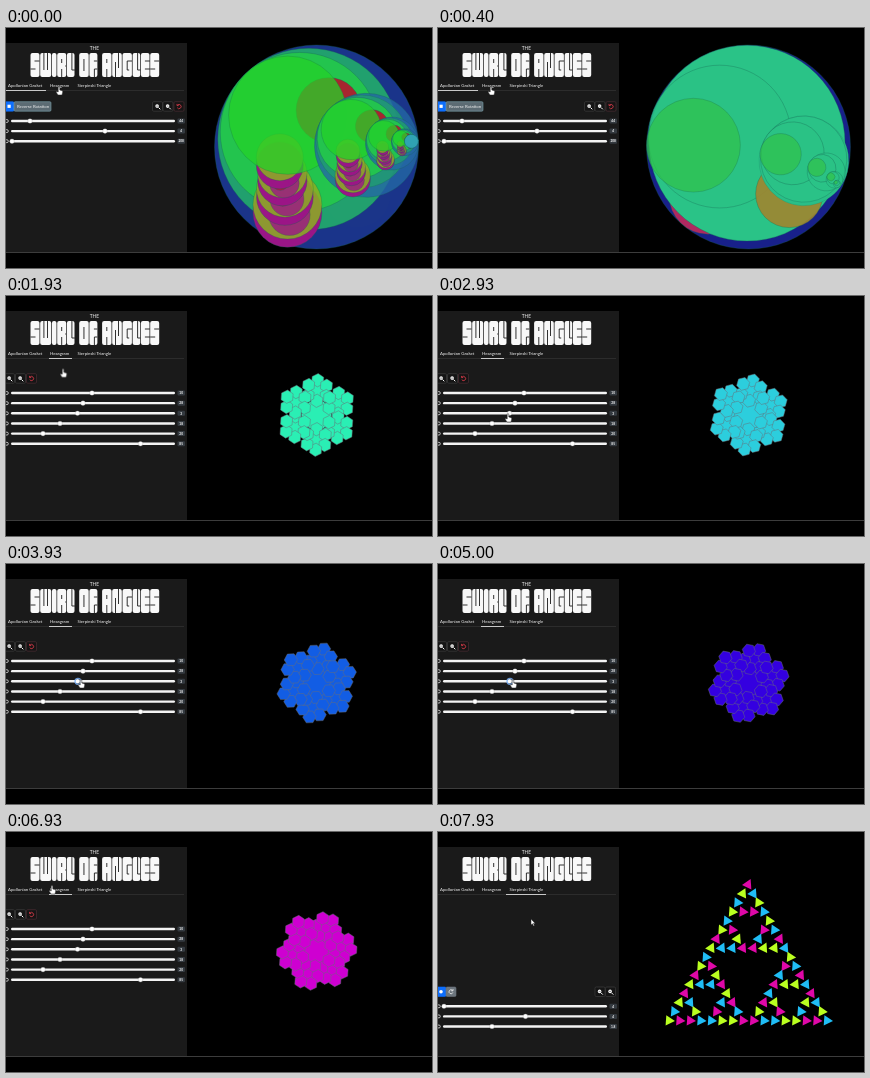
Animation, 426 px wide and 240 px high, one loop 8 s. Source, as an HTML page with a canvas:

```html
<!DOCTYPE html>
<html lang="en">
<head>
<meta charset="utf-8">
<title>The Swirl of Angles</title>
<style>
html, body { margin: 0; width: 100%; height: 100%; overflow: hidden; background: #000; }
canvas, svg { position: absolute; left: 0; top: 0; width: 426px; height: 240px; }
text { font-family: Lato, "Open Sans", sans-serif; font-size: 4.3px; fill: #f2f2f2; }
.badge { font-size: 3.2px; font-weight: 700; text-anchor: middle; fill: #fff; }
#underline, #cursor, #hand, #arrow, #ring, .controls { animation: 8s linear infinite; }
#underline { height: 1px; animation-name: underline; animation-timing-function: step-end; }
#gasketUi { animation-name: gasketUi; }
#hexUi { animation-name: hexUi; }
#triangleUi { animation-name: triangleUi; }
#cursor { animation-name: cursor; }
#hand { animation-name: hand; animation-timing-function: step-end; }
#arrow { animation-name: arrow; animation-timing-function: step-end; }
#ring { animation-name: ring; animation-timing-function: step-end; }
@keyframes underline {
  0% { x: 0; width: 40px; }
  11.6% { x: 43px; width: 23px; }
  93.8%, 100% { x: 68px; width: 40px; }
}
@keyframes gasketUi { 0%, 10.8% { opacity: 1; } 11.8%, 100% { opacity: 0; } }
@keyframes hexUi { 0%, 13.5% { opacity: 0; } 15.5%, 94.2% { opacity: 1; } 95%, 100% { opacity: 0; } }
@keyframes triangleUi { 0%, 95% { opacity: 0; } 96.7%, 100% { opacity: 1; } }
@keyframes cursor {
  0%, 22.4% { transform: translate(53px, 59px); animation-timing-function: ease-in-out; }
  27.5%, 38% { transform: translate(70px, 118px); }
  42%, 83.4% { transform: translate(75px, 116px); animation-timing-function: ease-in-out; }
  86.6% { transform: translate(46px, 54px); animation-timing-function: ease-in-out; }
  92%, 94.5% { transform: translate(88px, 55px); animation-timing-function: ease-in-out; }
  98.5%, 100% { transform: translate(93px, 87px); }
}
@keyframes hand { 0% { opacity: 1; } 96%, 100% { opacity: 0; } }
@keyframes arrow { 0% { opacity: 0; } 96%, 100% { opacity: 1; } }
@keyframes ring { 0% { opacity: 0; } 42% { opacity: .8; } 84%, 100% { opacity: 0; } }
</style>
</head>
<body>
<canvas id="stage"></canvas>
<svg viewBox="0 0 426 240">
  <rect y="15" width="181" height="209" fill="#1a1a1a"/>
  <rect y="224" width="426" height="1" fill="#3c3c3c"/>
  <text x="88.3" y="21.6" text-anchor="middle" style="font-size:4.8px">THE</text>
  <g id="title" role="img" aria-label="SWIRL OF ANGLES"></g>
  <text x="2" y="59">Apollonian Gasket</text>
  <text x="44" y="59">Hexagram</text>
  <text x="71.5" y="59">Sierpinski Triangle</text>
  <rect y="62" width="178" height="1" fill="#2c2c2c"/>
  <rect id="underline" y="62" fill="#c8c8c8"/>
  <g id="gasketUi" class="controls"></g>
  <g id="hexUi" class="controls"></g>
  <g id="triangleUi" class="controls"></g>
  <circle id="ring" cx="72" cy="117.3" r="3" fill="none" stroke="#79b3ff" stroke-width="1.3"/>
  <g id="cursor" stroke="#222" stroke-width=".5" fill="#fff">
    <path id="hand" d="M-.8 0Q0-1 .8 0V3L3.2 3.8Q4 4 3.7 5.2L3 8H-1L-3 5Q-2.6 4-.8 5Z"/>
    <path id="arrow" d="M0 0V6L1.4 4.8L2.4 7L3.4 6.5L2.4 4.4H4.2Z"/>
  </g>
</svg>
<script>
const byId = id => document.getElementById(id);

// Block lettering: a width and the dark cuts for each glyph.
const glyphs = {
  S: [9, 'M4 8H9M0 16H5'], W: [11, 'M3.7 0V17M7.3 0V17'], I: [4.6, ''],
  R: [9, 'M4.5 6V10M4.5 16V24M8 13H9'], L: [7.6, 'M5 0V17H8'],
  O: [9.5, 'M4.75 6V18'], F: [8, 'M4.5 8H8M8 16H5V24'],
  A: [9.4, 'M4.7 6V10M4.7 16V24'], N: [9.6, 'M3.3 9V24M6.3 0V15'],
  G: [9.4, 'M10 8H4.7V17H6.7'], E: [8.6, 'M4 8H9M4 16H9']
};
let penX = 24.5;
byId('title').innerHTML = [...'SWIRL OF ANGLES'].map(letter => {
  if (letter === ' ') { penX += 4; return ''; }
  const [width, cuts] = glyphs[letter];
  const mark = `<g transform="translate(${penX} 25)"><rect width="${width}" height="24" rx="2" fill="#f8f8f8"/>
    <path d="${cuts}" fill="none" stroke="#1a1a1a" stroke-width=".9"/></g>`;
  penX += width + .7;
  return mark;
}).join('');

const box = (x, y, w, fill, border) =>
  `<rect x="${x}" y="${y}" width="${w}" height="9.5" rx="1.2" fill="${fill}" stroke="${border}" stroke-width=".6"/>`;
const zoom = (x, y) => box(x - 5, y - 4.8, 10, '#151515', '#444') +
  `<path d="M${x + 1} ${y + 1}l1.8 1.8" stroke="#fff"/><circle cx="${x - .4}" cy="${y - .4}" r="1.8" fill="#fff"/>
   <path d="M${x - 1.4} ${y - .4}h2" stroke="#222" stroke-width=".5"/>`;
const reset = (x, y) => box(x - 5, y - 4.8, 10, '#151515', '#553038') +
  `<path d="M${x - 1.5} ${y - 1.4}a2.1 2.1 0 1 1-.3 2.5M${x - 2} ${y - 2.6}v1.7h1.7" fill="none" stroke="#e23b4b" stroke-width=".8"/>`;
const slider = (y, thumb, value) =>
  `<circle cx=".8" cy="${y}" r="1.5" fill="none" stroke="#ddd" stroke-width=".8"/>
   <rect x="5" y="${y - 1.2}" width="164" height="2.4" rx="1.2" fill="#f4f4f4"/>
   <circle cx="${thumb}" cy="${y}" r="2.3" fill="#fff" stroke="#999" stroke-width=".3"/>
   <rect x="171.5" y="${y - 2.5}" width="7.5" height="5" rx="1" fill="#343a40"/>
   <text class="badge" x="175.2" y="${y + 1.2}">${value}</text>`;
const sliders = (top, gap, rows) => rows.map(([thumb, value], i) => slider(top + i * gap, thumb, value)).join('');

byId('gasketUi').innerHTML = box(-2, 73.7, 10, '#0d6efd', '#0d6efd') +
  '<rect x="1.5" y="76.7" width="3.2" height="3.2" fill="#fff"/>' +
  box(8, 73.7, 37, '#5c6b73', '#7ba3ae') + '<text x="11" y="80">Reverse Rotation</text>' +
  zoom(151.5, 78.5) + zoom(162, 78.5) + reset(173, 78.5) +
  sliders(93, 10.1, [[24, '44'], [99, '4'], [6, '208']]);
byId('hexUi').innerHTML = zoom(3.5, 82.5) + zoom(14.5, 82.5) + reset(25.5, 82.5) +
  sliders(97, 10.15, [[86, '10'], [77, '28'], [71.5, '3'], [54, '18'], [37, '20'], [134.5, '85']]);
byId('triangleUi').innerHTML = box(-2, 155, 10, '#0d6efd', '#0d6efd') +
  '<circle cx="3" cy="159.8" r="1.8" fill="#fff"/>' + box(8, 155, 10, '#6c757d', '#6c757d') +
  '<path d="M14.5 158.4a2 2 0 1 0 .4 2M15 157v1.8h-1.8" fill="none" stroke="#fff" stroke-width=".7"/>' +
  zoom(162, 159.8) + zoom(172.5, 159.8) +
  sliders(174.3, 10.1, [[6, '4'], [87.5, '4'], [54, '1.8']]);

const canvas = byId('stage'), ctx = canvas.getContext('2d');
const density = window.devicePixelRatio || 1;
canvas.width = 426 * density;
canvas.height = 240 * density;
const rad = Math.PI / 180;
const lerp = (a, b, u) => a + (b - a) * u;
const mix = (a, b, u) => a.map((v, i) => lerp(v, b[i], u));
const rgb = c => `rgb(${c.map(Math.round)})`;

function disc(x, y, r, color, alpha = 1) {
  ctx.beginPath();
  ctx.arc(x, y, r, 0, 7);
  ctx.globalAlpha = alpha;
  ctx.fillStyle = color;
  ctx.fill();
  ctx.globalAlpha = .55 * alpha;
  ctx.stroke();
  ctx.globalAlpha = 1;
}

// A disc touching the unit circle from inside.
const tangent = (degrees, r, color, alpha) =>
  disc((1 - r) * Math.cos(degrees * rad), (1 - r) * Math.sin(degrees * rad), r, color, alpha);

function stack(alpha) {
  for (let i = 3; i >= 0; i--) {
    const x = -.36 + i * .025, y = .1 + i * .155, r = .23 + i * i * .012;
    disc(x, y + .08, r, '#9b1687', alpha);
    disc(x, y, r, '#8cb022', .85 * alpha);
    if (i) {
      disc(x + .02, y + .1, r * .6, '#9b1687', .8 * alpha);
      disc(x - .02, y + .09, .08, '#b31843', alpha);
      disc(x, y - .02, .1, '#8cb022', .8 * alpha);
    }
  }
}

function gasket(u, depth, scale) {
  const s = Math.min(u, 1), fade = 1 - s;
  const ratio = lerp(.51, .44, s), turn = lerp(-2, 14, u);
  ctx.lineWidth = .6 / scale;
  ctx.strokeStyle = '#166050';
  if (depth) disc(0, 0, 1, '#2468a5', .8 * fade);
  else disc(0, 0, 1, rgb(mix([26, 52, 138], [24, 32, 138], s)));
  if (!depth && s) tangent(130, .38, '#b02860', s);
  tangent(lerp(225, 250, s), lerp(.89, .96, s), rgb(mix([33, 160, 110], [42, 195, 135], s)), depth ? .75 : 1);
  tangent(lerp(222, 200, u), lerp(.78, .7, s), rgb(mix([36, 200, 75], [43, 195, 133], s)), .9);
  if (fade) {
    disc(.12, -.36, .32, '#a82630', fade);
    stack(fade);
  }
  if (s && !depth) disc(.4, .46, .33, '#a0852f', s * .9);
  tangent(lerp(228, 182, u), lerp(.58, .46, s), rgb(mix([36, 210, 40], [48, 195, 78], s)), .76);
  if (depth === 4) {
    disc(0, 0, 1, '#2fa3b4', fade);
    return;
  }
  ctx.save();
  ctx.rotate(turn * rad);
  ctx.translate(1 - ratio, 0);
  ctx.scale(ratio, ratio);
  if (s > .5 && !depth) disc(0, 0, 1, 'rgb(42,190,135)', s);
  gasket(u, depth + 1, scale * ratio);
  ctx.restore();
}

function polygon(x, y, r, sides, angle) {
  ctx.beginPath();
  for (let i = 0; i < sides; i++) {
    const a = angle + i * 2 * Math.PI / sides;
    ctx.lineTo(x + r * Math.sin(a), y - r * Math.cos(a));
  }
  ctx.closePath();
  ctx.fill();
}

const hexTones = [[930, 139, 100, 58], [2930, 185, 72, 52], [5000, 254, 100, 44], [6930, 299, 100, 41], [8000, 322, 100, 42]];
function hexTone(t) {
  const i = Math.max(1, hexTones.findIndex(tone => tone[0] >= t));
  const [from, to] = [hexTones[i - 1], hexTones[i]];
  const [, h, s, l] = mix(from, to, (t - from[0]) / (to[0] - from[0]));
  return `hsl(${h} ${s}% ${l}%)`;
}

function hexagram(t) {
  const turn = (-2.4 + 4 * (t / 1000 - 1)) * rad;
  ctx.fillStyle = hexTone(t);
  ctx.strokeStyle = 'rgba(105,110,120,.75)';
  ctx.lineWidth = .65;
  polygon(310.7, 119, 17, 6, turn);
  for (let i = 0; i < 6; i++) {
    const a = turn + i * 60 * rad;
    const x = 310.7 + 24.5 * Math.sin(a), y = 119 - 24.5 * Math.cos(a);
    polygon(x, y, 8, 6, turn * 2);
    for (let j = 0; j < 6; j++) {
      const b = turn * 2 + j * 60 * rad;
      polygon(x + 10.3 * Math.sin(b), y - 10.3 * Math.cos(b), 6.7, 6, turn * 3);
      ctx.stroke();
    }
  }
}

// Tones are ordered top, left, right; side branches mirror them.
function sierpinski(x, y, rows, tones, angle) {
  if (rows === 1) {
    ctx.fillStyle = tones[0];
    polygon(x, y, 6, 3, angle);
    return;
  }
  const half = rows / 2, dx = half * 5.27, dy = half * 9.07;
  const [top, left, right] = tones;
  const sideAngle = half === 1 ? angle : -angle;
  sierpinski(x, y, half, tones, angle);
  sierpinski(x - dx, y + dy, half, half === 1 ? [left] : [right, left, top], sideAngle);
  sierpinski(x + dx, y + dy, half, half === 1 ? [right] : [left, top, right], sideAngle);
}

function draw(now) {
  const t = now % 8000;
  ctx.setTransform(density, 0, 0, density, 0, 0);
  ctx.clearRect(0, 0, 426, 240);
  if (t < 930) {
    ctx.translate(310.5, 119);
    ctx.scale(102, 102);
    gasket(t / 400, 0, 102);
  } else if (t < 7500) hexagram(t);
  else sierpinski(310, 52.5, 16, ['#df08a8', '#baff20', '#20bdf5'], (26 + (t - 7930) * .012) * rad);
  requestAnimationFrame(draw);
}
requestAnimationFrame(draw);
</script>
</body>
</html>
```
